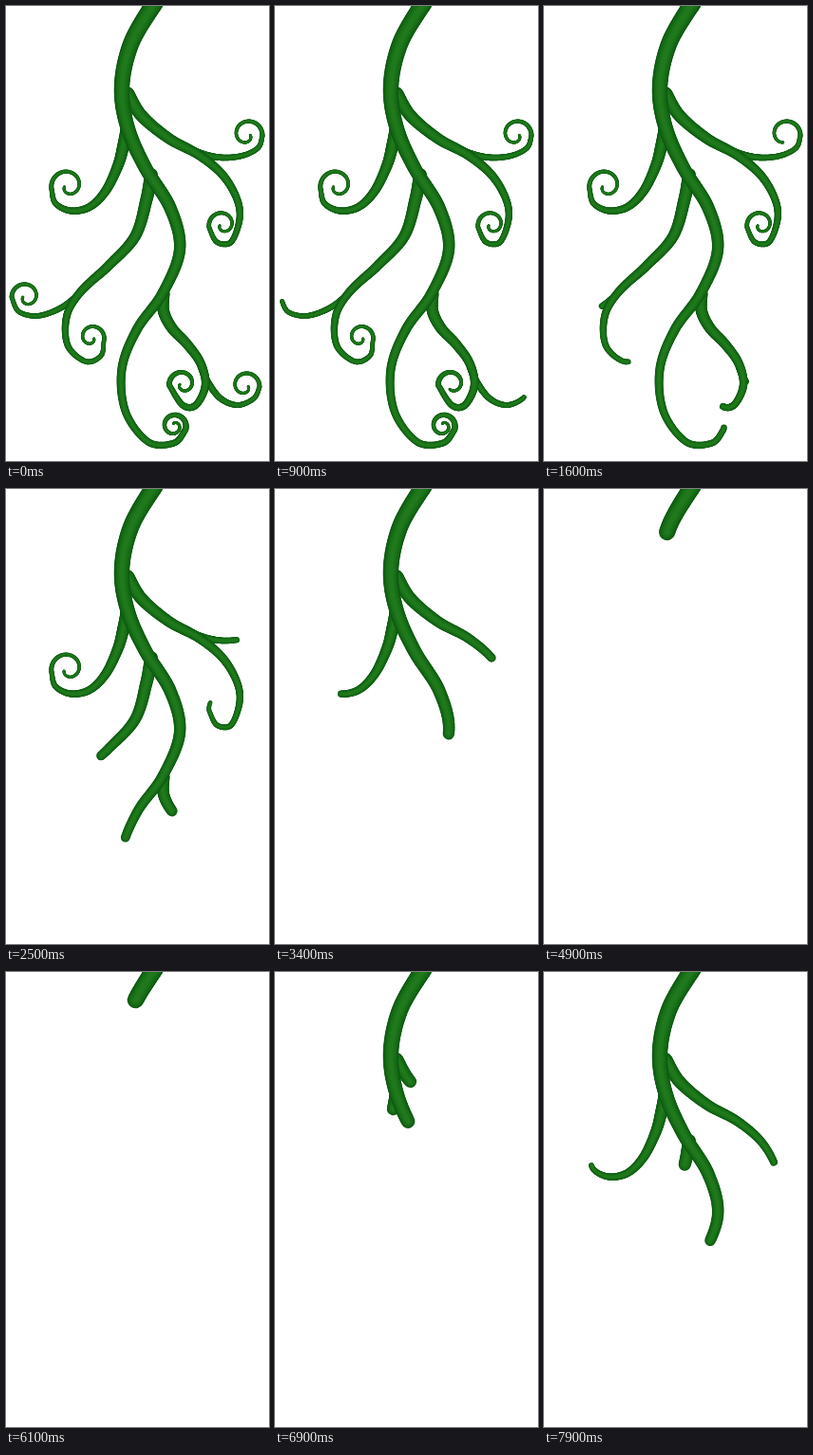
Recreate the animation shown at these times as an HTML page with a canvas. Size 277 by 480 pixels, loop 8000 ms.

```html
<!DOCTYPE html>
<html lang="en">
<head>
<meta charset="utf-8">
<title>Growing vine</title>
<style>
  html, body { margin: 0; width: 100%; height: 100%; overflow: hidden; background: #fff; }
  canvas { display: block; width: 277px; height: 480px; }
</style>
</head>
<body>
<canvas id="stage" width="277" height="480"></canvas>
<script>
const LOOP = 8000, STEP = 100, TURN = 5550;
const SUB = 16, CURL_STEPS = 60, TIP_RADIUS = 1.4;
const SHADES = [[1, '#0e5912'], [0.84, '#146616'], [0.6, '#1a7119'], [0.32, '#20791c']];
const ctx = document.getElementById('stage').getContext('2d');

const mix = (a, b, t) => a + (b - a) * t;
const point = s => s.split(',').map(Number);
const spline = (a, b, c, d, t) =>
  0.5 * (2 * b + (c - a) * t + (2 * a - 5 * b + 4 * c - d) * t * t + (3 * b - a - 3 * c + d) * t ** 3);

function stemPoints(path) {
  const p = path.split(' ').map(point), last = p.length - 1;
  const at = i => p[Math.min(Math.max(i, 0), last)];
  const out = [];
  for (let n = 0; n <= last * SUB; n++) {
    const i = Math.min(Math.floor(n / SUB), last - 1), t = n / SUB - i;
    out.push([0, 1].map(k => spline(at(i - 1)[k], at(i)[k], at(i + 1)[k], at(i + 2)[k], t)));
  }
  return out;
}

// Winds upwards and inwards from the end of the stem.
function curlPoints([x, y], [cx, cy], turns) {
  const radius = Math.hypot(x - cx, y - cy), angle = Math.atan2(y - cy, x - cx);
  const sweep = (x < cx ? 1 : -1) * turns * 2 * Math.PI;
  return Array.from({ length: CURL_STEPS }, (_, n) => {
    const s = (n + 1) / CURL_STEPS, r = radius * (1 - 0.8 * s ** 1.5), a = angle + sweep * s;
    return [cx + r * Math.cos(a), cy + r * Math.sin(a)];
  });
}

// born in ms, speed in px per 100 ms; thick and thin are the radii at the ends of the stem
function vine({ stem, curl, turns = 1, thick, thin, born, speed, sway = 0 }) {
  const body = stemPoints(stem);
  const coil = curlPoints(body[body.length - 1], point(curl), turns);
  let len = 0;
  const dots = [...body, ...coil].map(([x, y], i, all) => {
    if (i) len += Math.hypot(x - all[i - 1][0], y - all[i - 1][1]);
    return { x, y, len };
  });
  const stemLen = dots[body.length - 1].len;
  for (const d of dots) {
    d.r = d.len <= stemLen
      ? mix(thick, thin, d.len / stemLen)
      : mix(thin, TIP_RADIUS, (d.len - stemLen) / (len - stemLen));
  }
  const reach = age => age <= born ? 0
    : (age - born) / 100 * speed + sway * Math.sin(2 * Math.PI * (age - 500) / 3400);
  return { dots, reach };
}

// Side shoots first, so that each is covered by the stem it leaves.
const vines = [
  vine({ stem: '88,293 66,313 48,323 30,327 13,322 6,307', curl: '21,307',
    thick: 3.6, thin: 2.4, born: 3550, speed: 9 }),
  vine({ stem: '153,178 148,204 136,243 108,274 79,301 64,327 65,358 84,375 100,369 103,354', curl: '90,350',
    thick: 7, thin: 2.3, born: 2160, speed: 13.5 }),
  vine({ stem: '128,128 124,146 118,168 105,195 88,212 68,216 52,208 48,193', curl: '65,190',
    thick: 7, thin: 2.5, born: 1210, speed: 12.2 }),
  vine({ stem: '196,152 214,158 233,160 252,157 266,149 270,137', curl: '254,136',
    thick: 3.8, thin: 2.5, born: 2605, speed: 10.8 }),
  vine({ stem: '128,92 143,116 172,140 203,157 228,178 243,203 246,225 237,249 222,249 214,234', curl: '228,231',
    thick: 7, thin: 2.4, born: 1140, speed: 13.3 }),
  vine({ stem: '206,381 212,396 226,414 244,421 261,414 267,402', curl: '252,401',
    thick: 4, thin: 2.4, born: 3770, speed: 9 }),
  vine({ stem: '166,303 166,322 175,340 191,357 205,377 210,400 200,421 186,421 172,400', curl: '186,399',
    thick: 6.5, thin: 2.9, born: 2725, speed: 12 }),
  vine({ stem: '157,-4 132,39 122,85 128,128 147,171 173,213 183,257 165,303 138,341 122,383 126,428 150,460 177,461 189,447',
    curl: '177,443', turns: 1.35, thick: 9.2, thin: 3.2, born: 300, speed: 15.3, sway: 12 })
];

function drawVine({ dots, reach }, age) {
  const length = reach(age);
  if (length <= 0) return;
  for (const [scale, color] of SHADES) {
    ctx.strokeStyle = color;
    for (let i = 1; i < dots.length && dots[i - 1].len < length; i++) {
      const a = dots[i - 1], b = dots[i];
      const f = Math.min(1, (length - a.len) / (b.len - a.len));
      ctx.lineWidth = 2 * scale * mix(a.r, b.r, f);
      ctx.beginPath();
      ctx.moveTo(a.x, a.y);
      ctx.lineTo(mix(a.x, b.x, f), mix(a.y, b.y, f));
      ctx.stroke();
    }
  }
}

// The vine draws back until TURN, then grows again.
function frame(now) {
  const t = Math.floor(now % LOOP / STEP) * STEP;
  ctx.clearRect(0, 0, 277, 480);
  ctx.lineCap = 'round';
  for (const v of vines) drawVine(v, Math.abs(t - TURN));
}

const start = performance.now();
function loop() {
  frame(performance.now() - start);
  requestAnimationFrame(loop);
}
loop();
</script>
</body>
</html>
```
